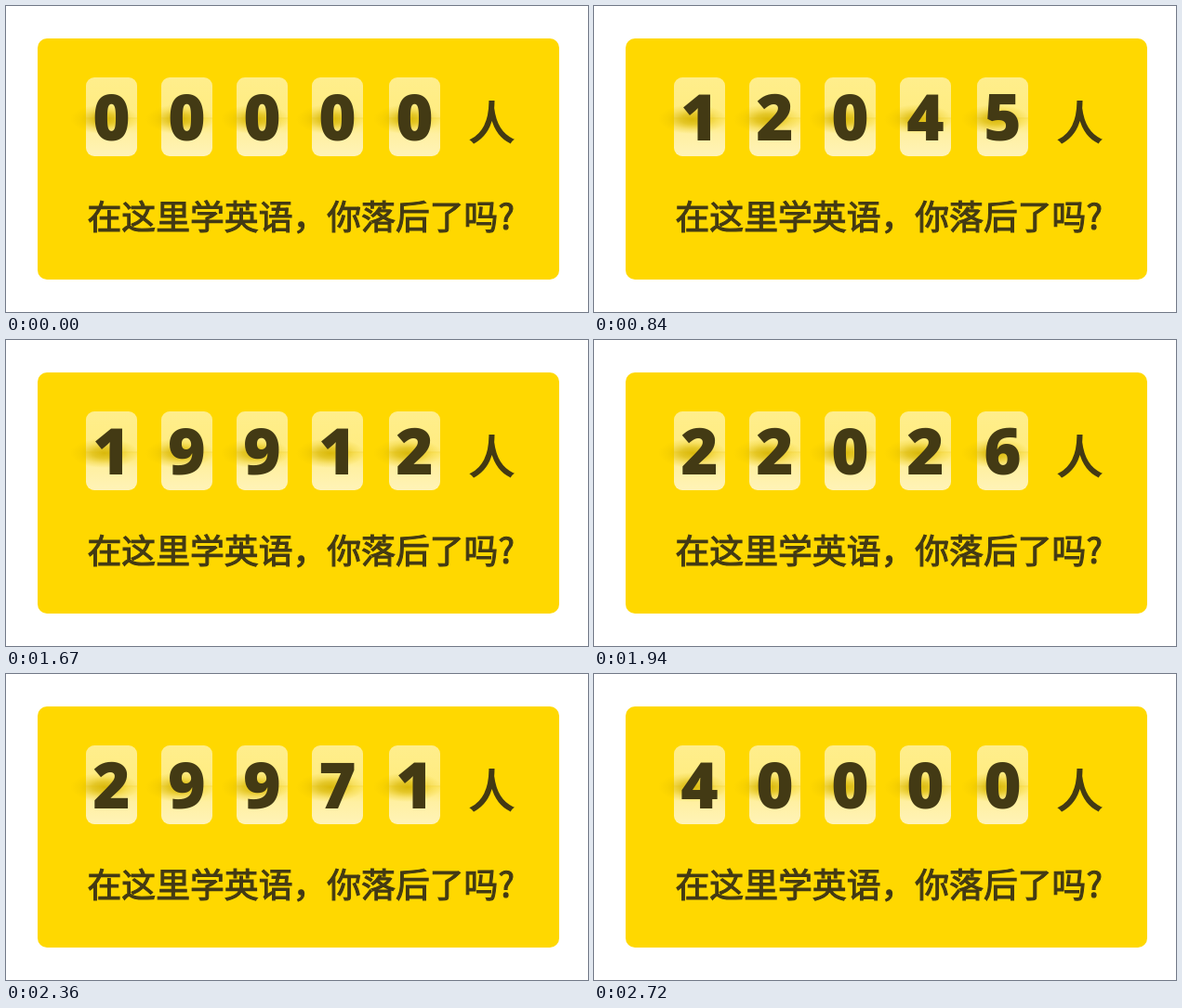
An HTML page for the animation above (3.62 s loop, 626 by 330 pixels).

```html
<!DOCTYPE html>
<html lang="zh-CN">
<head>
<meta charset="utf-8">
<style>
  html, body { margin: 0; width: 100%; height: 100%; overflow: hidden; background: #fff; }
  svg { display: block; }
  text { fill: #433a14; }
  .digit { font: 800 69px "Open Sans", "Noto Sans", sans-serif; text-anchor: middle; }
  .cjk { font-family: "Noto Sans CJK SC", "Noto Sans CJK", sans-serif; stroke: #433a14; }
</style>
</head>
<body>
<svg width="626" height="330" viewBox="0 0 626 330">
  <defs>
    <linearGradient id="pane" x2="0" y2="1">
      <stop offset="0" stop-color="#ffee8c"/>
      <stop offset=".5" stop-color="#ffec80"/>
      <stop offset=".53" stop-color="#ffe96e"/>
      <stop offset=".72" stop-color="#fff0a2"/>
      <stop offset="1" stop-color="#fff3b8"/>
    </linearGradient>
    <radialGradient id="shade">
      <stop offset="0" stop-color="#d4b200" stop-opacity=".9"/>
      <stop offset=".35" stop-color="#d8b600" stop-opacity=".68"/>
      <stop offset=".7" stop-color="#e0bc00" stop-opacity=".24"/>
      <stop offset="1" stop-color="#e6c000" stop-opacity="0"/>
    </radialGradient>
  </defs>
  <rect x="34" y="35" width="561" height="260" rx="10" fill="#ffd800"/>
  <g id="cards"></g>
  <text class="cjk" x="522.6" y="143.5" font-size="48.5" text-anchor="middle" stroke-width="2">人</text>
  <text class="cjk" x="87.5" y="241.2" font-size="36.85" stroke-width="1.1">在这里学英语，你落后了吗?</text>
</svg>
<script>
const LOOP = 3620;

// Counting speeds up: [number of steps, ms per step]
const paces = [[1, 70], [1, 170], [8, 100], [12, 70], [28, 30]];
const starts = [0];
for (const [count, ms] of paces)
  for (let i = 0; i < count; i++) starts.push(starts.at(-1) + ms);

// [step, count] pairs, linear in between
const marks = [[0, 0], [5, 9914], [6, 10000], [12, 16134], [19, 19912], [20, 20000],
               [30, 25066], [38, 29971], [39, 30000], [49, 39946], [50, 40000]];

function countAt(step) {
  const i = Math.max(1, marks.findIndex(m => m[0] >= step));
  const [s0, v0] = marks[i - 1], [s1, v1] = marks[i];
  return Math.round(v0 + (v1 - v0) * (step - s0) / (s1 - s0));
}

const lefts = [86, 167, 248, 329, 412];
const cards = document.getElementById("cards");
cards.innerHTML = lefts.map(x => `
  <rect x="${x}" y="77" width="55" height="85" rx="9" fill="url(#pane)"/>
  <ellipse cx="${x + 20}" cy="122" rx="37" ry="16" fill="url(#shade)"/>
  <path d="M${x} 121h55" stroke="#d9b500" stroke-opacity=".2"/>
  <text class="digit" x="${x + 27.5}" y="145.2"></text>`).join("");
const digits = cards.querySelectorAll("text");

function draw(now) {
  const step = starts.findLastIndex(s => s <= now % LOOP);
  const shown = String(countAt(step)).padStart(5, "0");
  digits.forEach((el, i) => el.textContent = shown[i]);
}

const origin = performance.now();
function tick() {
  draw(performance.now() - origin);
  requestAnimationFrame(tick);
}
tick();
</script>
</body>
</html>
```
